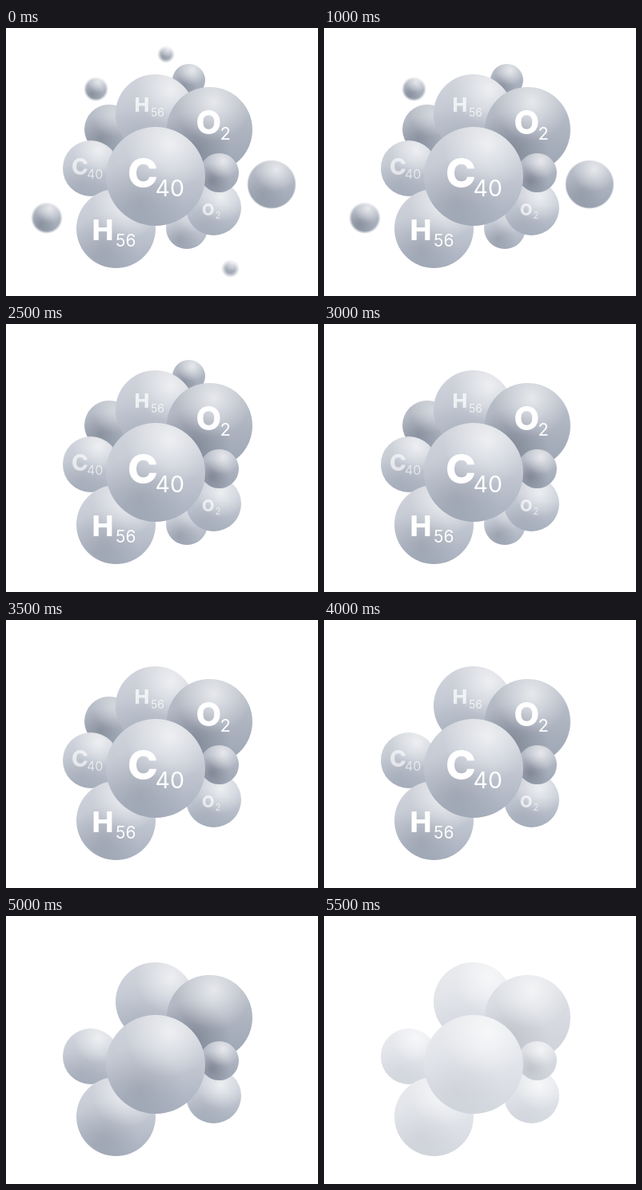
An HTML page that plays this animation: 390x336 px, repeating every 6 s.

```html
<!DOCTYPE html>
<html lang="en">
<head>
<meta charset="utf-8">
<title>Molecule</title>
<style>
html, body { margin: 0; width: 100%; height: 100%; overflow: hidden; background: #fff; }
#stage { position: relative; width: 390px; height: 336px; overflow: hidden; }
#stage, .ball, #labels { animation: 6s step-end infinite; }
#stage { animation-name: dim; }

/* x, y, r: circle; h: highlight spot; s: shaded spot; d: shade strength; g: glow strength */
.ball {
  --h: 64% 18%; --s: 34% 76%; --d: .2; --g: .66;
  --top: #d2d5dc; --mid: #c5cad4; --low: #a8b0be;
  position: absolute;
  left: calc((var(--x) - var(--r)) * 1px);
  top: calc((var(--y) - var(--r)) * 1px);
  width: calc(var(--r) * 2px);
  height: calc(var(--r) * 2px);
  border-radius: 50%;
  background:
    radial-gradient(circle calc(var(--r) * .9px) at var(--h), rgb(255 255 255 / var(--g)), transparent),
    radial-gradient(circle calc(var(--r) * .9px) at var(--s), rgb(85 92 106 / var(--d)), transparent),
    linear-gradient(var(--top), var(--mid) 45%, var(--low));
}
.dark { --d: .35; --h: 60% 20%; --s: 32% 70%; --top: #bcc1ca; --mid: #b0b6c2; --low: #9ca4b2; }
.soft {
  --core: 84%;
  -webkit-mask: radial-gradient(closest-side, #000 var(--core), transparent);
  mask: radial-gradient(closest-side, #000 var(--core), transparent);
}

#labels { position: absolute; inset: 0; animation-name: fade; }
text { fill: #fff; font-family: Inter, Roboto, sans-serif; }
.el { font-weight: 800; }

@keyframes out1 { 8.333% { opacity: 0; } }
@keyframes out2 { 16.666% { opacity: 0; } }
@keyframes out3 { 25% { opacity: 0; } }
@keyframes out4 { 33.333% { opacity: 0; } }
@keyframes out5 { 41.666% { opacity: 0; } }
@keyframes out6 { 50% { opacity: 0; } }
@keyframes out7 { 58.333% { opacity: 0; } }
@keyframes out8 { 66.666% { opacity: 0; } }
@keyframes fade { 75% { opacity: .5; } 83.333% { opacity: 0; } }
@keyframes dim { 91.666% { opacity: .5; } }
</style>
</head>
<body>
<div id="stage">
  <i class="ball dark soft" style="--x:200;--y:33;--r:11;--core:55%;--d:.2;animation-name:out1"></i>
  <i class="ball dark soft" style="--x:280.5;--y:301.5;--r:11.5;--core:50%;--d:.1;animation-name:out2"></i>
  <i class="ball dark soft" style="--x:112;--y:76.5;--r:15.5;--core:76%;animation-name:out3"></i>
  <i class="ball dark soft" style="--x:51;--y:237.5;--r:20;--core:82%;animation-name:out4"></i>
  <i class="ball dark soft" style="--x:332;--y:196;--r:31;--core:93%;--d:.2;animation-name:out5"></i>
  <i class="ball dark" style="--x:228.5;--y:65.5;--r:20.5;animation-name:out6"></i>
  <i class="ball" style="--x:226;--y:251;--r:26;--d:.25;--g:.3;animation-name:out7"></i>
  <i class="ball dark" style="--x:129;--y:127;--r:31;--g:.4;animation-name:out8"></i>

  <i class="ball" style="--x:186;--y:107;--r:49.5;--h:70% 20%;--d:.08"></i>
  <i class="ball" style="--x:106;--y:176;--r:35;--d:.1"></i>
  <i class="ball" style="--x:259;--y:225.5;--r:34.5;--h:64% 30%;--d:.1"></i>
  <i class="ball dark" style="--x:254.5;--y:127.5;--r:53.5;--h:55% 18%;--s:30% 74%;--d:.45"></i>
  <i class="ball dark" style="--x:266.5;--y:181;--r:24.5;--d:.45"></i>
  <i class="ball" style="--x:137.5;--y:251.5;--r:49.5"></i>
  <i class="ball" style="--x:187;--y:185.5;--r:62"></i>

  <svg id="labels" width="390" height="336">
    <g><text class="el" x="152" y="199.500" font-size="51">C</text><text x="186.500" y="211" font-size="28.500">40</text></g>
    <g><text class="el" x="237.500" y="133" font-size="41">O</text><text x="267.500" y="140" font-size="22">2</text></g>
    <g><text class="el" x="107.500" y="266" font-size="36">H</text><text x="137" y="274" font-size="21">56</text></g>
    <g opacity=".72"><text class="el" x="160.500" y="105" font-size="25">H</text><text x="181" y="110.500" font-size="14">56</text></g>
    <g opacity=".62"><text class="el" x="82" y="183.500" font-size="28">C</text><text x="101" y="189" font-size="16">40</text></g>
    <g opacity=".65"><text class="el" x="245" y="235" font-size="20">O</text><text x="261.500" y="239" font-size="11.500">2</text></g>
  </svg>
</div>
</body>
</html>
```
